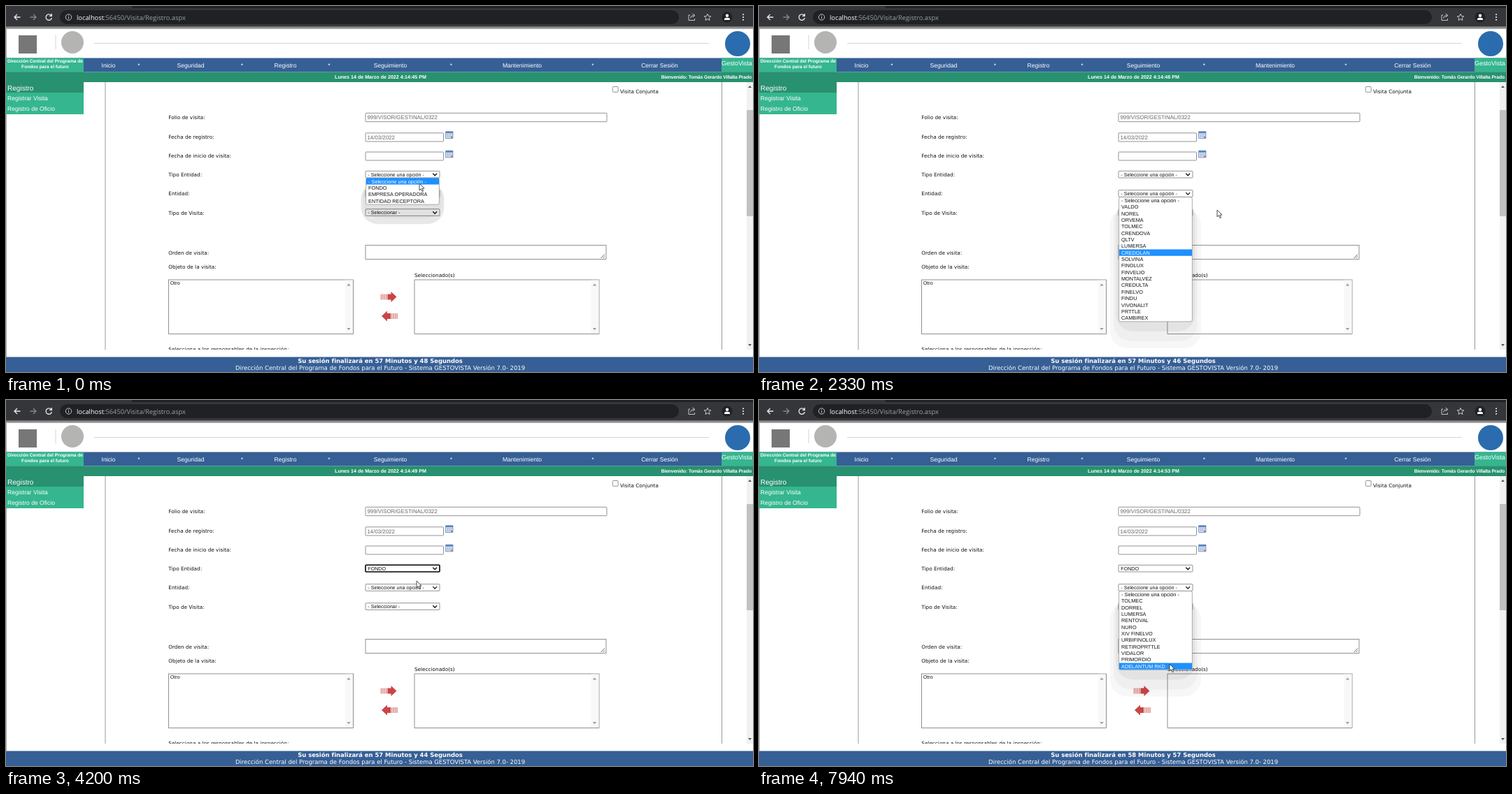
An HTML page that plays this animation: 1068 by 524 pixels, repeating every 8 s.

```html
<!DOCTYPE html>
<html lang="es">
<head>
<meta charset="utf-8">
<title>Registro de visita</title>
<style>
html, body { margin: 0; width: 100%; height: 100%; overflow: hidden; background: #fff; }
svg { display: block; width: 100%; height: 100%; }
text { font-family: "Liberation Sans", Arial, sans-serif; text-rendering: geometricPrecision; white-space: pre; }
.mid { text-anchor: middle; }
.white { fill: #fff; }
.bold { font-weight: 700; }
.label text, .foot { font-family: "DejaVu Sans", Verdana, sans-serif; }
.label { font-size: 7.28px; fill: #111; }
.foot { fill: #fff; }
.nav { font-size: 8.55px; fill: #fff; text-anchor: middle; }
.box { fill: #fff; stroke: #767676; stroke-width: .8; }
.value { font-size: 7.85px; fill: #666; }
.pick { font-size: 7.15px; fill: #111; }
.opt { font-size: 7.35px; fill: #111; }
.opt.on { fill: #fff; }
.url { font: 9.3px "Open Sans", sans-serif; fill: #9aa0a6; }
.icon { fill: none; stroke: #e8eaed; stroke-width: 1.3; }
</style>
</head>
<body>
<svg viewBox="0 0 1068 524">
  <defs>
    <clipPath id="view"><rect x="0" y="109" width="1068" height="383"/></clipPath>
    <linearGradient id="edge" x2="0" y2="1"><stop stop-color="#666"/><stop offset="1" stop-color="#b5b5b5"/></linearGradient>
    <g id="cal">
      <rect width="11" height="10.5" fill="#5b83bd"/>
      <rect x="1" y="3" width="9" height="6.6" fill="#fff"/>
      <path d="M1 5.1h9M1 7.4h9M3.2 3v6.6M5.5 3v6.6M7.8 3v6.6" stroke="#7d9fd0" stroke-width=".7"/>
      <rect x="7.9" y="7.6" width="2" height="2" fill="#d9603c"/>
    </g>
    <g id="arrow">
      <path d="M.5 4v8M3 4v8M5.5 4v8M8 4v8" stroke="#d98080" stroke-width="1.4"/>
      <path d="M9.5 4h5V.6l8 7.4-8 7.4V12h-5z" fill="#cb4545"/>
    </g>
    <path id="chev" d="M0 0l2.9 3 2.9-3" fill="none" stroke="#111" stroke-width="1.3"/>
    <g id="bars" fill="#999">
      <rect x="253" y=".5" width="11" height="76.5" fill="#f8f8f8"/>
      <path d="M255.300 8.500l2.700-3 2.700 3zM255.300 69l2.700 3 2.700-3z"/>
    </g>
  </defs>

  <!-- browser bar -->
  <rect width="1068" height="30" fill="#35363a"/>
  <path d="M180 0h888v3H183q-3 0-3-3z" fill="#202124"/>
  <rect x="77" y="6" width="885" height="20" rx="10" fill="#202124"/>
  <rect y="29" width="1068" height="4" fill="url(#edge)"/>
  <g class="icon">
    <path d="M20.500 16h-8.500M16 12l-4 4 4 4"/>
    <path d="M34.500 16h8.500M39 12l4 4-4 4" stroke="#85878a"/>
    <path d="M64.600 13.500a4.200 4.200 0 1 0 .8 3.500M65.300 11v3.300h-3.300"/>
    <g stroke="#c4c7ca" stroke-width="1">
      <circle cx="89.500" cy="16" r="4.200"/><path d="M89.500 15.300v3M89.500 13.400v1"/>
      <path d="M978 13h-2v7.500h8.500V18M978.500 17.500q.5-4 5-4M981.500 11l3.500 2.500-3.500 2.600"/>
      <path d="M1003 11.300l1.400 3.200 3.500.3-2.700 2.300.8 3.400-3-1.800-3 1.800.8-3.400-2.700-2.300 3.500-.3z"/>
    </g>
  </g>
  <circle cx="1031" cy="16" r="7.500" fill="#202124"/>
  <path d="M1027 20v-1q0-2.200 4-2.200t4 2.200v1z" class="white"/><circle cx="1031" cy="13.800" r="2.200" class="white"/>
  <g class="white"><circle cx="1054" cy="12.300" r="1"/><circle cx="1054" cy="16" r="1"/><circle cx="1054" cy="19.700" r="1"/></g>
  <text x="101" y="19.500" class="url"><tspan fill="#fff">localhost</tspan>:56450/Visita/Registro.aspx</text>

  <!-- page head -->
  <rect x="18" y="42" width="26" height="26" fill="#777"/>
  <path d="M71 42v20M126 53.500h879" stroke="#d5d5d5"/>
  <circle cx="95" cy="52" r="16" fill="#b4b4b2"/>
  <circle cx="1046" cy="54" r="18" fill="#2a6cae"/>
  <rect y="74.500" width="1068" height="20" fill="#365f95"/>
  <path d="M0 74.500h111v20H0zM1023 74.500h45v20h-45z" fill="#35b68f"/>
  <rect y="94.500" width="1068" height="14.500" fill="#28916f"/>
  <g class="white bold mid" font-size="6.6"><text x="56" y="80.800">Dirección Central del Programa de</text><text x="56" y="89">Fondos para el futuro</text></g>
  <text x="1023" y="85.300" class="white" font-size="9">GestoVista</text>
  <g class="nav" id="nav"></g>
  <text id="clock" x="535.500" y="103.600" class="white bold mid" font-size="7.12"></text>
  <text x="1066" y="103.600" class="white bold" text-anchor="end" font-size="6.8" letter-spacing="-.15">Bienvenido: Tomás Gerardo Villalta Prado</text>
  <rect y="109" width="111" height="46" fill="#35b68f"/>
  <rect y="109" width="111" height="15" fill="#28916f"/>
  <g class="white" font-size="8.55"><text x="2" y="120.500" font-size="10.050">Registro</text><text x="2" y="135">Registrar Visita</text><text x="2" y="149.700">Registro de Oficio</text></g>

  <!-- form -->
  <g clip-path="url(#view)">
    <path d="M142 109v383M1023.500 109v383" stroke="#999"/>
    <g class="label" id="labels"></g>
    <rect x="867.300" y="115.500" width="7.800" height="7.800" rx="1" class="box"/>
    <g class="box">
      <rect x="514" y="153.300" width="345" height="12.400" rx="1"/>
      <rect x="514" y="181.800" width="111.500" height="12.200" rx="1"/>
      <rect x="514" y="209" width="111.500" height="12" rx="1"/>
      <rect x="514" y="342.500" width="344" height="20"/>
      <rect x="232.500" y="392" width="264" height="77.500"/>
      <rect x="584" y="392" width="264" height="77.500"/>
    </g>
    <path d="M850.500 361l5.500-5.500M853.500 361l2.500-2.500" stroke="#555" stroke-width=".9"/>
    <use href="#bars" x="232" y="392"/><use href="#bars" x="583.500" y="392"/>
    <g class="value"><text x="516.500" y="162.300">999/VISOR/GESTINAL/0322</text><text x="516.500" y="190.700">14/03/2022</text></g>
    <text x="234.800" y="398.700" class="pick">Otro</text>
    <g id="images">
      <use href="#cal" x="628.300" y="179.300"/><use href="#cal" x="628.300" y="206.800"/>
      <use href="#arrow" x="536" y="408.500"/><use href="#arrow" transform="translate(559.500 436) scale(-1 1)"/>
    </g>
    <g id="picks"></g>
  </g>
  <rect x="1059" y="109" width="9" height="383" fill="#f1f1f1"/>
  <rect x="1059" y="149" width="9" height="152" fill="#c1c1c1"/>
  <path d="M1061 117l2.500-3 2.500 3zM1061 484l2.500 3 2.500-3z" fill="#555"/>
  <path d="M.5 33v41M.5 155v347" stroke="#aaa"/>

  <rect y="502.500" width="1068" height="21.500" fill="#365f95"/>
  <text id="left" x="535" y="511" class="foot bold mid" font-size="8.43"></text>
  <text x="535" y="521" class="foot mid" font-size="8.45">Dirección Central del Programa de Fondos para el Futuro - Sistema GESTOVISTA Versión 7.0- 2019</text>

  <g id="menus"></g>
  <path id="cursor" d="M0 0v9.800l2.300-2.100 1.700 3.900 1.700-.8-1.700-3.700h3.100z" fill="#fff" stroke="#222" stroke-width=".8"/>
</svg>
<script>
const LOOP = 8000, PITCH = 9.35;
const $ = id => document.getElementById(id);

function add(parent, tag, attrs, text) {
  const el = document.createElementNS('http://www.w3.org/2000/svg', tag);
  for (const k in attrs) el.setAttribute(k, attrs[k]);
  if (text) el.textContent = text;
  return parent.appendChild(el);
}

[['Inicio', 146.5], ['Seguridad', 264], ['Registro', 399.5], ['Seguimiento', 549.5],
 ['Mantenimiento', 738], ['Cerrar Sesión', 934.5]].forEach(([s, x]) => add($('nav'), 'text', { x, y: 87.6 }, s));
[190, 337.5, 462, 636.5, 839].forEach(x => add($('nav'), 'text', { x, y: 88 }, '*'));

[['Folio de visita:', 162], ['Fecha de registro:', 189.8], ['Fecha de inicio de visita:', 217],
 ['Tipo Entidad:', 243.8], ['Entidad:', 271], ['Tipo de Visita:', 298.6], ['Orden de visita:', 355.8],
 ['Objeto de la visita:', 376], ['Selecciona a los responsables de la inspección:', 493.5],
 ['Seleccionado(s)', 388, 584], ['Visita Conjunta', 124.7, 878]]
  .forEach(([s, y, x = 232.3]) => add($('labels'), 'text', { x, y }, s));

const NONE = '- Seleccione una opción -';
const [kind] = [[236.3, NONE], [263.6, NONE], [290.7, '- Seleccionar -']].map(([y, s]) => {
  const box = add($('picks'), 'rect', { x: 514, y, width: 106, height: 9.7, rx: 1, class: 'box' });
  const text = add($('picks'), 'text', { x: 517.3, y: y + 7.3, class: 'pick' }, s);
  add($('picks'), 'use', { href: '#chev', x: 610.3, y: y + 3.5 });
  return { box, text };
});

function menu(top, names, shades) {
  const items = [NONE, ...names], g = add($('menus'), 'g', {});
  const end = top + items.length * PITCH + .6;
  for (const [side, drop, lift, alpha] of shades)
    add(g, 'rect', { x: 514.5 - side, y: top + lift, width: 105 + 2 * side, height: end + drop - top - lift,
      rx: 24, fill: '#000', 'fill-opacity': alpha });
  add(g, 'rect', { x: 514.6, y: top, width: 104.8, height: end - top, rx: 2.5, fill: '#fff', stroke: '#8d8d8d', 'stroke-width': .7 });
  const bar = add(g, 'rect', { x: 515, width: 104, height: PITCH, fill: '#1e90ff' });
  const rows = items.map((s, i) => add(g, 'text', { x: 518, y: top + i * PITCH + 7.3 }, s));
  return {
    show(open, row) {
      g.style.display = open ? '' : 'none';
      bar.setAttribute('y', top + row * PITCH);
      rows.forEach((r, i) => r.setAttribute('class', i === row ? 'opt on' : 'opt'));
    }
  };
}
const wide = [[12.5, 38, 16, .03], [7.5, 28, 10, .03], [4, 14, 6, .05]];
const menus = {
  kind: menu(246.2, ['FONDO', 'EMPRESA OPERADORA', 'ENTIDAD RECEPTORA'], [[7, 28, 6, .09], [4, 20, 4, .03]]),
  bank: menu(273.6, ['VALDO', 'NOREL', 'ORVEMA', 'TOLMEC', 'CRENDOVA', 'QLTV', 'LUMERSA', 'CREDOLAN', 'SOLVINA',
    'FINOLUX', 'FINVELIO', 'MONTALVEZ', 'CREDULTA', 'FINELVO', 'FINDU', 'VIVONALIT', 'PRTTLE', 'CAMBIREX'], wide),
  fund: menu(273.6, ['TOLMEC', 'DORREL', 'LUMERSA', 'RENTOVAL', 'NURO', 'XIV FINELVO', 'URBIFINOLUX',
    'RETIROPRTTLE', 'VIDALOR', 'PRIMORDIO', 'ADELANTUM RKD'], wide)
};

// time, pointer x, pointer y, lit row
const path = [
  [0, 591, 254, 0], [150, 591, 255, 1], [470, 624, 253, 1], [620, 645, 251, 1], [770, 652, 251, 0],
  [920, 640, 257, 0], [1060, 620, 266, 0], [1330, 610, 290, 1], [1480, 606, 320, 4],
  [1600, 604, 340, 6], [1750, 603.5, 353, 7], [1880, 606, 362, 9], [2020, 612, 350, 8],
  [2160, 632, 322, 8], [2310, 655, 292, 8], [2450, 670, 276, 8], [2600, 674, 271, 0],
  [2720, 681, 270, 0], [2870, 677, 266, 0], [3020, 655, 256, 0], [3160, 630, 246, 0],
  [3310, 613, 241, 0], [3600, 600, 247, 0], [3730, 591, 253, 0], [3880, 587, 258, 1],
  [4200, 587, 259, 1], [4370, 604, 259, 0], [4500, 630, 258, 0], [4630, 644, 257, 0],
  [6230, 626, 265, 0], [6380, 612, 270, 0], [7240, 607, 290, 1], [7390, 601, 312, 4],
  [7530, 597, 335, 6], [7660, 593, 355, 8], [7800, 589, 370, 10], [7940, 587, 378, 11]
];
const opened = [[0, 'kind'], [620, ''], [1190, 'bank'], [2450, ''], [3460, 'kind'], [4200, ''], [6670, 'fund']];
const ticks = [470, 1330, 2310, 3460, 4370, 5360, 6380, 7390];
const counts = [620, 1600, 2600, 3600, 4630];
const renewed = [5930, 6970, 7940];

const at = (steps, t) => steps.findLast(s => s[0] <= t);
const passed = (times, t) => times.filter(x => x <= t).length;

function draw(t) {
  const [, x, y, row] = at(path, t);
  $('cursor').setAttribute('transform', `translate(${x} ${y})`);
  const open = at(opened, t)[1];
  for (const k in menus) menus[k].show(k === open, row);

  const focus = t >= 4200 && t < 4930;
  kind.text.textContent = t >= 4200 ? 'FONDO' : NONE;
  kind.box.style.cssText = focus ? 'stroke:#000;stroke-width:1.6' : '';
  $('images').style.display = t >= 4930 && t < 5080 ? 'none' : '';

  $('clock').textContent = `Lunes 14 de Marzo de 2022 4:14:${45 + passed(ticks, t)} PM`;
  const fresh = passed(renewed, t);
  const [min, sec] = fresh ? [58, 60 - fresh] : [57, 48 - passed(counts, t)];
  $('left').textContent = `Su sesión finalizará en ${min} Minutos y ${sec} Segundos`;
}

function loop() {
  draw(performance.now() % LOOP);
  requestAnimationFrame(loop);
}
loop();
</script>
</body>
</html>
```
